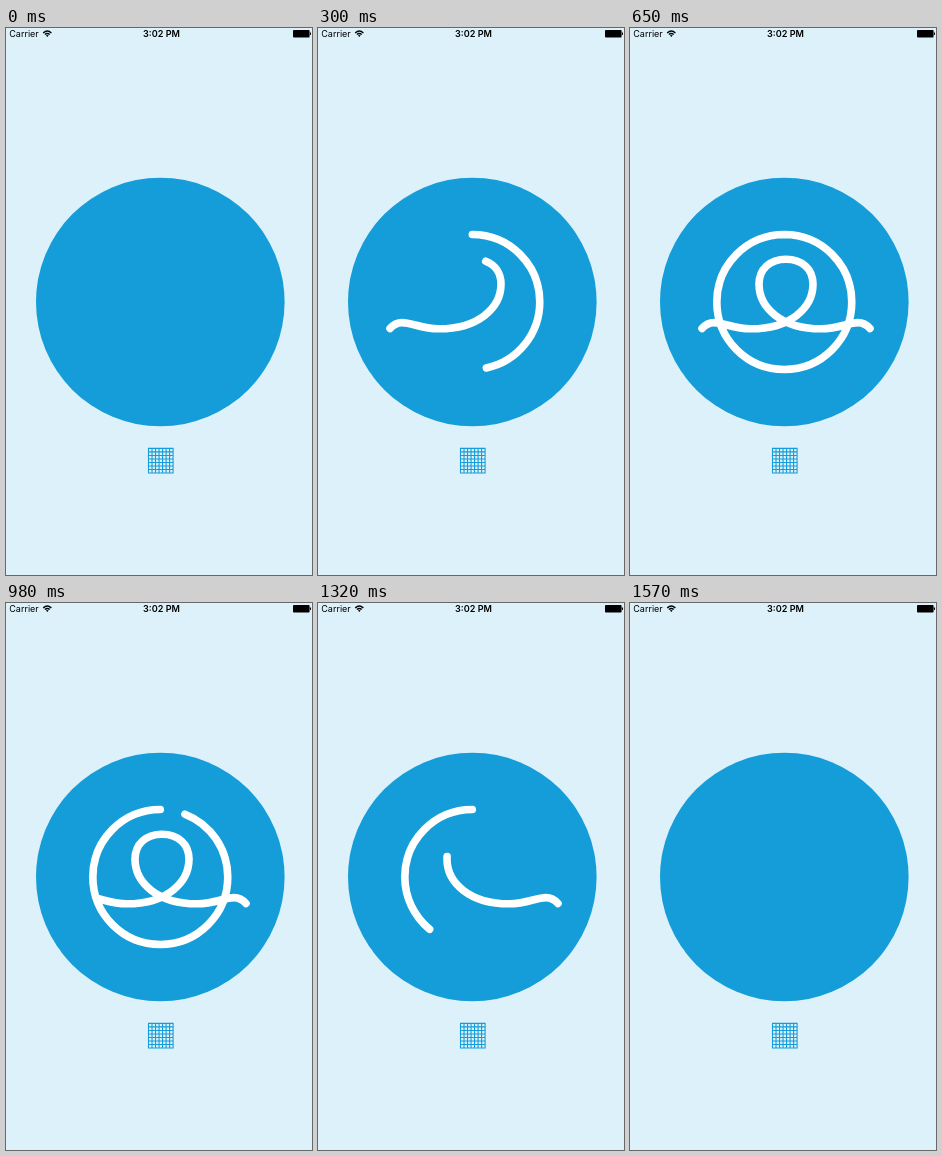
An HTML page that plays this animation: 306x547 px, repeating every 1710 ms.

```html
<!DOCTYPE html>
<html lang="en">
<head>
<meta charset="utf-8">
<title>Line drawing</title>
<style>
  html, body { margin: 0; width: 100%; height: 100%; overflow: hidden; background: #dcf1fa; }
  svg { display: block; width: 306px; height: 547px; }
  text { font: 9px Inter, sans-serif; }
  .clock { font-weight: 600; font-size: 9.1px; text-anchor: middle; }
  .line { fill: none; stroke: #fff; stroke-width: 7.6; stroke-linecap: round; }
</style>
</head>
<body>
<svg viewBox="0 0 306 547">
  <rect width="306" height="547" fill="#dcf1fa"/>

  <text x="3.3" y="9">Carrier</text>
  <g fill="none" stroke="#000" stroke-width="1.4">
    <path d="M37.2 4.9Q41.3 1 45.4 4.9"/>
    <path d="M38.9 6.6Q41.3 4.4 43.7 6.6"/>
  </g>
  <path d="M39.9 7.5Q41.3 6.4 42.7 7.5L41.3 9Z"/>
  <text class="clock" x="155.5" y="9">3:02 PM</text>
  <rect x="287" y="2" width="16.6" height="7.4" rx="1"/>
  <rect x="304" y="4.5" width="1" height="2.4"/>

  <circle cx="154.3" cy="274" r="124.3" fill="#149dd8"/>
  <path id="grid" fill="none" stroke="#149dd8" stroke-width="1.1"/>

  <path class="line" pathLength="1"
    d="M154.3 206.5A67.5 67.5 0 0 1 154.3 341.5A67.5 67.5 0 0 1 154.3 206.5"/>
  <path class="line" pathLength="1"
    d="M72 300.5C75.5 296.5 80 294.6 84 294.6C94 294.6 103 300.8 121 300.8
       C160 300.8 183 280 183 256C183 241 172 231.2 156 231.2
       C140 231.2 129 241 129 256C129 280 152 300.8 191 300.8
       C209 300.8 218 294.6 228 294.6C232 294.6 236.5 296.5 240 300.5"/>
</svg>
<script>
  const LOOP = 1710;
  const lines = document.querySelectorAll('.line');

  const cells = 7, left = 142.5, top_ = 420.4, size = 24.6;
  let d = '';
  for (let i = 0; i <= cells; i++) {
    const at = i * size / cells;
    d += `M${left + at} ${top_ - 0.5}v${size + 1}M${left - 0.5} ${top_ + at}h${size + 1}`;
  }
  document.getElementById('grid').setAttribute('d', d);

  // Steps last 30 ms, with an occasional 20 ms one.
  const drawTime = k => 30 + 30 * k - 10 * Math.max(0, Math.floor((k - 6) / 4));
  const eraseTime = k => 980 + 30 * k - 10 * Math.floor((k + 3.7) / 5.33);

  function progress(t, stepTime, last, first, gain) {
    let k = -1;
    while (k < last && t >= stepTime(k + 1)) k++;
    return k < 0 ? 0 : Math.min(1, first + gain * k);
  }

  function render(t) {
    const end = progress(t, drawTime, 22, 0.056, 0.0456);
    const start = progress(t, eraseTime, 21, 0.0595, 0.0458);
    const length = end - start;
    for (const line of lines) {
      line.style.visibility = length > 0 ? 'visible' : 'hidden';
      line.setAttribute('stroke-dasharray', length === 1 ? 'none' : `${length} 2`);
      line.setAttribute('stroke-dashoffset', -start);
    }
  }

  let origin;
  function frame(now) {
    origin ??= now;
    render((now - origin) % LOOP);
    requestAnimationFrame(frame);
  }
  render(0);
  requestAnimationFrame(frame);
</script>
</body>
</html>
```
